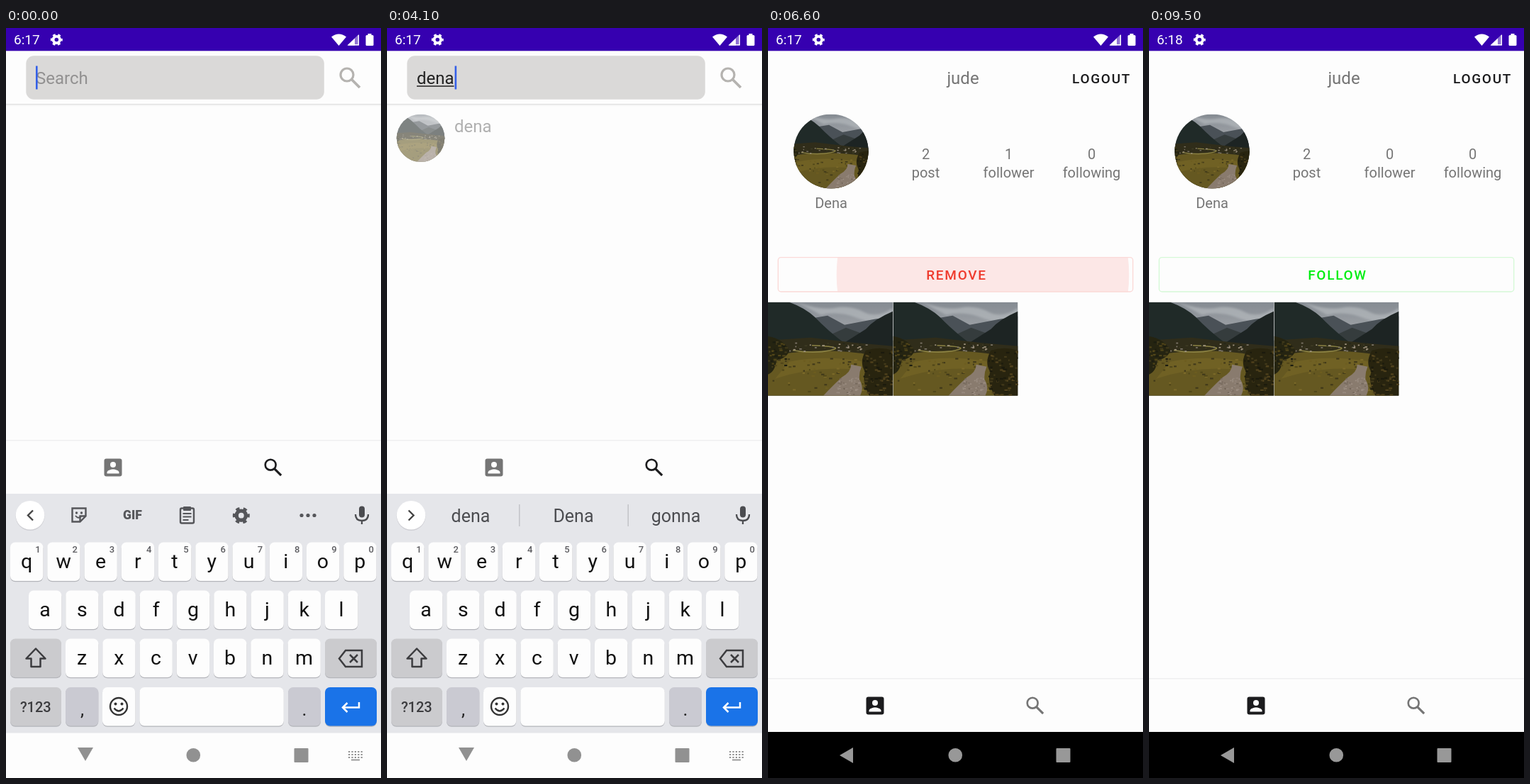
Recreate the animation shown at these times as an HTML page. Size 529 by 1058 pixels, loop 9.6 s.

```html
<!DOCTYPE html>
<html lang="en">
<head>
<meta charset="utf-8">
<title>Search and profile</title>
<style>
  html, body { margin: 0; width: 100%; height: 100%; overflow: hidden; background: #fdfdfd; }
  svg { display: block; width: 100vw; height: 100vh; font-family: Roboto, sans-serif; }
  .mid { text-anchor: middle; }
  .caps { font-weight: 500; font-size: 19px; letter-spacing: 1.7px; }
</style>
</head>
<body>
<svg id="stage" viewBox="0 0 529 1058" preserveAspectRatio="none"></svg>
<script>
const LOOP = 9600;
const KEY_TIMES = [1000, 1400, 1750, 2090];
const QUERY = 'dena';
const HINTS = [['do', 'did', 'don’t'], ['de', 'den', 'dear'], ['den', 'dena', 'Den'], ['dena', 'Dena', 'gonna']];
const HINT_LAG = 150;
const RESULT_AT = 4040;
const PROFILE_AT = 4900;
const LOADS = [{ from: PROFILE_AT, to: 5900, turn: 193 }, { from: 7200, to: 8800, turn: 91 }];
const RIPPLE_AT = 6450;
const MINUTE_AT = 7600;

const clamp = v => Math.max(0, Math.min(1, v));
const ramp = (t, from, length) => clamp((t - from) / length);

// --- markup helpers ---
const rect = (x, y, w, h, fill, r = 0, more = '') =>
  `<rect x="${x}" y="${y}" width="${w}" height="${h}" rx="${r}" fill="${fill}" ${more}/>`;
const circle = (x, y, r, fill, more = '') => `<circle cx="${x}" cy="${y}" r="${r}" fill="${fill}" ${more}/>`;
const path = (d, fill, more = '') => `<path d="${d}" fill="${fill}" ${more}/>`;
const line = (d, color, width, more = '') => path(d, 'none', `stroke="${color}" stroke-width="${width}" ${more}`);
const text = (x, y, size, fill, value, more = 'class="mid"') =>
  `<text x="${x}" y="${y}" font-size="${size}" fill="${fill}" ${more}>${value}</text>`;

const glass = (x, y, scale, color) => `<g transform="translate(${x} ${y}) scale(${scale})">` +
  circle(-4, -4, 9, 'none', `stroke="${color}" stroke-width="3.2"`) + line('M2.5 2.5L14 14', color, 3.8) + '</g>';

function gear(x, y, r, color) {
  const tooth = Math.PI * r * 1.6 / 12;
  return circle(x, y, r * .55, 'none', `stroke="${color}" stroke-width="${r * .45}"`) +
    circle(x, y, r * .8, 'none', `stroke="${color}" stroke-width="${r * .4}" stroke-dasharray="${tooth}" stroke-dashoffset="${tooth / 2}"`);
}

const accountBox = (y, color) => rect(138.5, y - 12.5, 25, 25, color, 3) + circle(151, y - 4, 4, '#fff') +
  path(`M142.5 ${y + 8.5}v-1.5c0-3 5.5-4.6 8.5-4.6s8.5 1.6 8.5 4.6v1.5z`, '#fff');

const tabs = (top, accountColor, searchColor) =>
  rect(0, top, 529, 75, '#fdfdfd') + rect(0, top - 1, 529, 1.5, '#efeff0') +
  accountBox(top + 38, accountColor) + glass(376.5, top + 37.5, .83, searchColor);

const navShapes = color => circle(264.3, 1025.8, 9.8, color) + rect(406.5, 1016, 20, 20, color, 1);

function statusBar() {
  return rect(0, 0, 529, 32.3, '#3600b0') +
    text(11, 23.3, 19, '#fff', '6:17', 'id="clock"') + gear(71.3, 16.5, 8.5, '#fff') +
    path('M459 12.5Q469.5 4.5 480 12.5L469.5 25z', '#fff') +
    path('M498 8.5V24.5H481.5z', '#fff', 'opacity=".45"') + path('M492 14.5V24.5H481.5z', '#fff') +
    line('M497.3 10V23.7H483', '#fff', 1.5) +
    rect(507.5, 10, 11, 15, '#fff', 1.5) + rect(510.5, 8, 5, 3, '#fff');
}

// --- keyboard ---
const PITCH = 52.25;
function key(x, y, w, fill, content = '') {
  return rect(x, y + 1.3, w, 54.5, '#b4b5ba', 7) + rect(x, y, w, 54.5, fill, 7) + content;
}
function letterRow(letters, left, top, digits = '') {
  return [...letters].map((letter, i) => {
    const x = left + i * PITCH;
    const digit = digits[i] ? text(x + 39, top + 14.5, 13, '#5c5c60', digits[i], 'class="mid" font-weight="500"') : '';
    return key(x, top, 46.3, '#fdfdfd', text(x + 23, top + 36, 28.5, '#111', letter) + digit);
  }).join('');
}

function toolbar() {
  const ink = '#55565a';
  return line('M38 680.5l-7 7 7 7', '#444', 2.4) +
    line('M93.500 677.500h19v11l-8 8h-11z M112.500 688.500h-8v8', ink, 2.4) +
    circle(99.5, 684, 1.7, ink) + circle(106.5, 684, 1.7, ink) + line('M98 688q4 5 8 1', ink, 2) +
    text(178.5, 693, 17.5, ink, 'GIF', 'class="mid" font-weight="800"') +
    rect(246, 677.5, 19, 21, 'none', 2, `stroke="${ink}" stroke-width="2.4"`) + rect(250, 675, 11, 6, ink, 1) +
    line('M249.500 685h12M249.500 689.500h12M249.500 694h8', ink, 2) +
    gear(331.8, 687.7, 12, ink) +
    [417, 426, 435].map(x => circle(x, 687.5, 2.6, ink)).join('');
}

function keyboard() {
  const grey = '#cbcbce';
  const dots = [0, 1, 2].map(row => line(`M483 ${1021 + row * 4}h20`, '#919191', 2, 'stroke-dasharray="2.2 2.2"')).join('');
  return rect(0, 657, 529, 338, '#e5e6ea') + rect(0, 994.5, 529, 63.5, '#fdfdfd') +
    circle(34, 688.5, 20.5, '#cfcfd4') + circle(34, 687.3, 20.3, '#fff') +
    `<g id="toolbar">${toolbar()}</g><g id="hints">` +
    line('M30.500 680.500l7 7-7 7', '#444', 2.4) + line('M186.800 672v31M340.200 672v31', '#c3c4c8', 1.5) +
    [118, 263, 407.5].map(x => text(x, 697, 25, '#4b4c50', '', 'class="mid hint"')).join('') + '</g>' +
    rect(498, 674.5, 8, 16, '#4b4c50', 4) + line('M493 686q0 9 9 9t9-9M502 695v5', '#4b4c50', 2.3) +
    letterRow('qwertyuiop', 6, 725.5, '1234567890') +
    letterRow('asdfghjkl', 32, 793.5) + letterRow('zxcvbnm', 84, 861.5) +
    key(6, 861.5, 72, grey, line('M42 875.500L55.500 889.500H48.500V901H35.500V889.500H28.500z', '#3c3c3f', 2.5, 'stroke-linejoin="round"')) +
    key(450, 861.5, 73, grey, line('M470 889.500L479 878H502V901H479zM485 884l11 11M496 884l-11 11', '#3c3c3f', 2.5)) +
    key(6, 930, 72, grey, text(41.8, 965, 20, '#3c3c3f', '?123', 'class="mid" font-weight="500"')) +
    key(84, 930, 46.3, '#cacad2', text(107.5, 970, 26, '#222', ',')) +
    key(136, 930, 46.3, '#fdfdfd', circle(159, 957, 12, 'none', 'stroke="#333" stroke-width="2.4"') +
      circle(154.5, 953.5, 2, '#333') + circle(163.5, 953.5, 2, '#333') + line('M152.500 959.500q6.500 8 13 0', '#333', 2.3)) +
    key(188.3, 930, 203.5, '#fdfdfd') +
    key(398, 930, 46, '#cacad2', text(421, 970, 26, '#222', '.')) +
    key(450, 930, 73, '#1a73e8', line('M498 951v7.500H476M481.500 952l-6.500 6.500 6.500 6.500', '#fff', 2.5)) +
    path('M101 1015h22l-11 19z', '#919191') + navShapes('#919191') + dots + line('M487 1032.500h12', '#919191', 1.8);
}

// --- landscape picture, 176 x 132 ---
function landscape() {
  let seed = 7;
  const rand = () => (seed = seed * 16807 % 2147483647) / 2147483647;
  const specks = (count, x, y, w, h, size, colors) => Array.from({ length: count }, () =>
    rect((x + rand() * w).toFixed(1), (y + rand() * h).toFixed(1), (size * (.6 + rand())).toFixed(1),
      (size * .7).toFixed(1), colors[Math.floor(rand() * colors.length)])).join('');
  return rect(0, 0, 176, 132, 'url(#sky)') +
    `<g filter="url(#soft)">${path('M40 0Q75 12 95 8T135 14T176 8V25Q150 32 125 22T75 18z', '#b4b8bd', 'opacity=".7"')}</g>` +
    path('M66 22L84 19L108 32L150 24L176 20V70H60z', '#4a5157') +
    path('M88 46L110 36L132 44V64H88z', '#353c3d') +
    path('M0 0H30Q52 8 66 21Q84 40 108 58L0 72z', '#202a28') +
    path('M176 13Q150 24 138 38L108 57L176 80z', '#1d2423') +
    path('M0 54L60 50L120 57L176 62V132H0z', '#302d1a') +
    path('M20 73Q80 64 145 74L160 132H0V90z', '#655821') +
    path('M30 84Q80 74 135 84L130 96Q70 88 10 108z', '#766526', 'opacity=".7"') +
    line('M35 68Q65 73 88 68T62 61', '#8b8244', 1.6) +
    specks(45, 30, 57, 108, 12, 2.4, ['#7d7669', '#252719', '#a09480', '#3e3b24']) +
    specks(80, 0, 78, 140, 52, 3, ['#504719', '#7b6929', '#40391a', '#6d5d20']) +
    path('M117 88L132 91Q128 100 129 109Q136 121 130 132H78Q92 117 104 106Q118 98 117 88z', '#897b6e') +
    specks(50, 96, 106, 32, 25, 2.2, ['#9f9185', '#74675b', '#94877c']) +
    path('M138 68Q158 62 176 68V132H143Q132 112 137 98Q128 85 138 68z', '#28240f') +
    path('M0 48Q22 52 30 68Q28 78 12 82Q10 98 0 102z', '#252411') +
    specks(75, 134, 68, 42, 64, 3.2, ['#42391a', '#1b1a0d', '#51421d']) +
    specks(35, 0, 54, 24, 38, 3, ['#3f381a', '#1b1c10', '#514519']);
}
const picture = (x, y, scale, more = '') =>
  `<g ${more}><use href="#landscape" transform="translate(${x} ${y}) scale(${scale})"/></g>`;

// --- screens ---
function searchScreen() {
  return rect(0, 107, 529, 1.2, '#dedede') + rect(0, 108.2, 529, 2, '#f4f4f4') +
    rect(28.3, 39.3, 420.5, 61.5, '#dad9d8', 11) + glass(485, 70, 1, '#b5b3b0') +
    text(42, 79, 24, '#929191', 'Search', 'id="prompt"') +
    text(42, 79, 24, '#222', '', 'id="typed"') +
    rect(42, 81.3, 0, 1.5, '#222', 0, 'id="underline"') +
    rect(42, 53.5, 2.6, 33, '#3460e8', 0, 'id="cursor"') +
    `<g id="result">${picture(2.6, 121.5, .51, 'clip-path="url(#thumbClip)"')}${text(95, 147.3, 24, '#777', QUERY, '')}</g>` +
    tabs(582, '#757575', '#1c1c1e') + keyboard();
}

function profileScreen() {
  const grey = '#757575';
  const stat = (x, value, label, id = '') =>
    text(x, 185, 20, grey, value, `class="mid" ${id}`) + text(x, 211, 20, grey, label);
  const shade = 'url(#shimmer)';
  return text(275, 79, 24, grey, 'jude') + text(429, 77.5, 19, '#1a1a1c', 'LOGOUT', 'class="caps"') +
    '<g id="skeleton">' + circle(89, 174, 52.8, shade) + rect(164.3, 164.8, 351, 52, shade) +
    rect(13.5, 233.6, 151, 26.5, shade) + rect(27, 273.5, 474.5, 35.2, shade) + rect(13.5, 323, 502, 50, shade, 4) +
    '<g id="spinner">' + circle(264.5, 92.5, 28, '#000', 'opacity=".22" filter="url(#soft)"') +
    circle(264.5, 91.5, 27, '#fafaf8') + line('', '#111', 3.4, 'id="arc"') + '</g></g>' +
    '<g id="details">' + stat(222.5, '2', 'post') + stat(339.5, '1', 'follower', 'id="followers"') +
    stat(456.5, '0', 'following') + text(89, 254.3, 20, grey, 'Dena') +
    circle(303, 348, 0, '#ef3b2d', 'id="ripple" clip-path="url(#buttonClip)"') +
    rect(14.3, 323.6, 500.4, 48.4, 'none', 4, 'id="border" stroke-width="1.4"') +
    text(266, 355, 19, '#ef3b2d', 'REMOVE', 'id="action" class="mid caps"') +
    '<g id="photos">' + picture(19, 121.5, .797, 'clip-path="url(#avatarClip)"') +
    picture(0, 386.7, 1) + picture(176.5, 386.7, 1) + '</g></g>' +
    tabs(918, '#1c1c1e', '#757575') + rect(0, 993, 529, 65, '#000') +
    path('M101 1026l19-11v22z', '#989898') + navShapes('#989898');
}

const clip = (id, shape) => `<clipPath id="${id}">${shape}</clipPath>`;
document.getElementById('stage').innerHTML = `<defs>
  <linearGradient id="sky" x2="0" y2=".4"><stop stop-color="#858b92"/><stop offset="1" stop-color="#a7aaae"/></linearGradient>
  <linearGradient id="shimmer" gradientUnits="userSpaceOnUse" x1="0" y1="0" x2="458" y2="265">
    <stop stop-color="#f2f2f1"/><stop offset=".5" stop-color="#c6c6c6"/><stop offset="1" stop-color="#f2f2f1"/></linearGradient>
  <filter id="soft"><feGaussianBlur stdDeviation="1.8"/></filter>
  ${clip('frame', rect(0, 0, 176, 132, '#000'))}
  ${clip('thumbClip', circle(47.5, 155.2, 33.8, '#000'))}
  ${clip('avatarClip', circle(89, 174, 52.6, '#000'))}
  ${clip('buttonClip', rect(14, 323, 501, 49.5, '#000', 4))}
  <g id="landscape" clip-path="url(#frame)">${landscape()}</g></defs>
  ${rect(0, 0, 529, 1058, '#fdfdfd')}
  <g id="search">${searchScreen()}</g><g id="profile">${profileScreen()}</g>${statusBar()}`;

// --- motion ---
const el = id => document.getElementById(id);
const set = (id, attrs) => Object.entries(attrs).forEach(([name, value]) => el(id).setAttribute(name, value));
const show = (id, on) => { el(id).style.display = on ? '' : 'none'; };
const hintLabels = document.querySelectorAll('.hint');

// cubic-bezier(.4, 0, .2, 1)
function fastOutSlowIn(x) {
  let low = 0, high = 1, u = .5;
  for (let i = 0; i < 14; i++) {
    u = (low + high) / 2;
    const v = 1 - u;
    if (1.2 * u * v * v + .6 * u * u * v + u ** 3 < x) low = u; else high = u;
  }
  return 3 * u * u * (1 - u) + u ** 3;
}

function drawSpinner(t, load) {
  const cycles = t / 1332 + .146;
  const turn = Math.floor(cycles), p = cycles - turn;
  const head = 284 * fastOutSlowIn(clamp(p * 2)) + 4;
  const tail = 284 * fastOutSlowIn(clamp(p * 2 - 1));
  const start = 291.6 * cycles + 288 * turn + tail + load.turn;
  const sweep = head - tail;
  const point = deg => {
    const a = deg * Math.PI / 180;
    return `${264.5 + 12 * Math.cos(a)} ${91.8 + 12 * Math.sin(a)}`;
  };
  const scale = ramp(t, load.from - 50, 150);
  set('arc', { d: `M${point(start)}A12 12 0 ${sweep > 180 ? 1 : 0} 1 ${point(start + sweep)}` });
  set('spinner', { transform: `translate(264.5 91.5) scale(${scale}) translate(-264.5 -91.5)` });
}

function drawSearch(t) {
  const count = KEY_TIMES.filter(time => time <= t).length;
  const hintCount = KEY_TIMES.filter(time => time + HINT_LAG <= t).length;
  const since = count ? t - KEY_TIMES[count - 1] : t;
  el('typed').textContent = QUERY.slice(0, count);
  const width = count ? el('typed').getComputedTextLength() : 0;
  show('prompt', !count);
  set('underline', { width });
  set('cursor', { x: 42 + width + (count ? 1 : 0) });
  show('cursor', since % 1000 < 500);
  show('toolbar', !hintCount);
  show('hints', hintCount);
  if (hintCount) hintLabels.forEach((label, i) => { label.textContent = HINTS[hintCount - 1][i]; });
  set('result', { opacity: ramp(t, RESULT_AT, 105) });
}

function drawProfile(t) {
  const load = LOADS.find(item => t >= item.from && t < item.to);
  show('skeleton', load);
  show('details', !load);
  if (load) {
    const shift = ((t + 1366) % 2400) / 2400 * 2116 - 1058;
    set('shimmer', { gradientTransform: `translate(${shift} 0)` });
    drawSpinner(t, load);
    return;
  }
  const removed = t >= LOADS[1].to;
  el('followers').textContent = removed ? '0' : '1';
  el('action').textContent = removed ? 'FOLLOW' : 'REMOVE';
  set('action', { fill: removed ? '#00ee10' : '#ef3b2d' });
  set('border', { stroke: removed ? '#d6f9d7' : '#fbdad8' });
  const spread = ramp(t, RIPPLE_AT, 340);
  set('ripple', { r: 300 * (1 - (1 - spread) ** 2), opacity: removed ? 0 : .11 * (1 - ramp(t, 6800, 250)) });
  set('photos', { opacity: ramp(t, (removed ? LOADS[1].to : LOADS[0].to) + 200, 300) });
}

function render(time) {
  const t = Math.floor(time % LOOP / 100) * 100;
  const onProfile = t >= PROFILE_AT;
  show('search', !onProfile);
  show('profile', onProfile);
  el('clock').textContent = t < MINUTE_AT ? '6:17' : '6:18';
  (onProfile ? drawProfile : drawSearch)(t);
}

const began = performance.now();
function tick() {
  render(performance.now() - began);
  requestAnimationFrame(tick);
}
tick();
</script>
</body>
</html>
```
